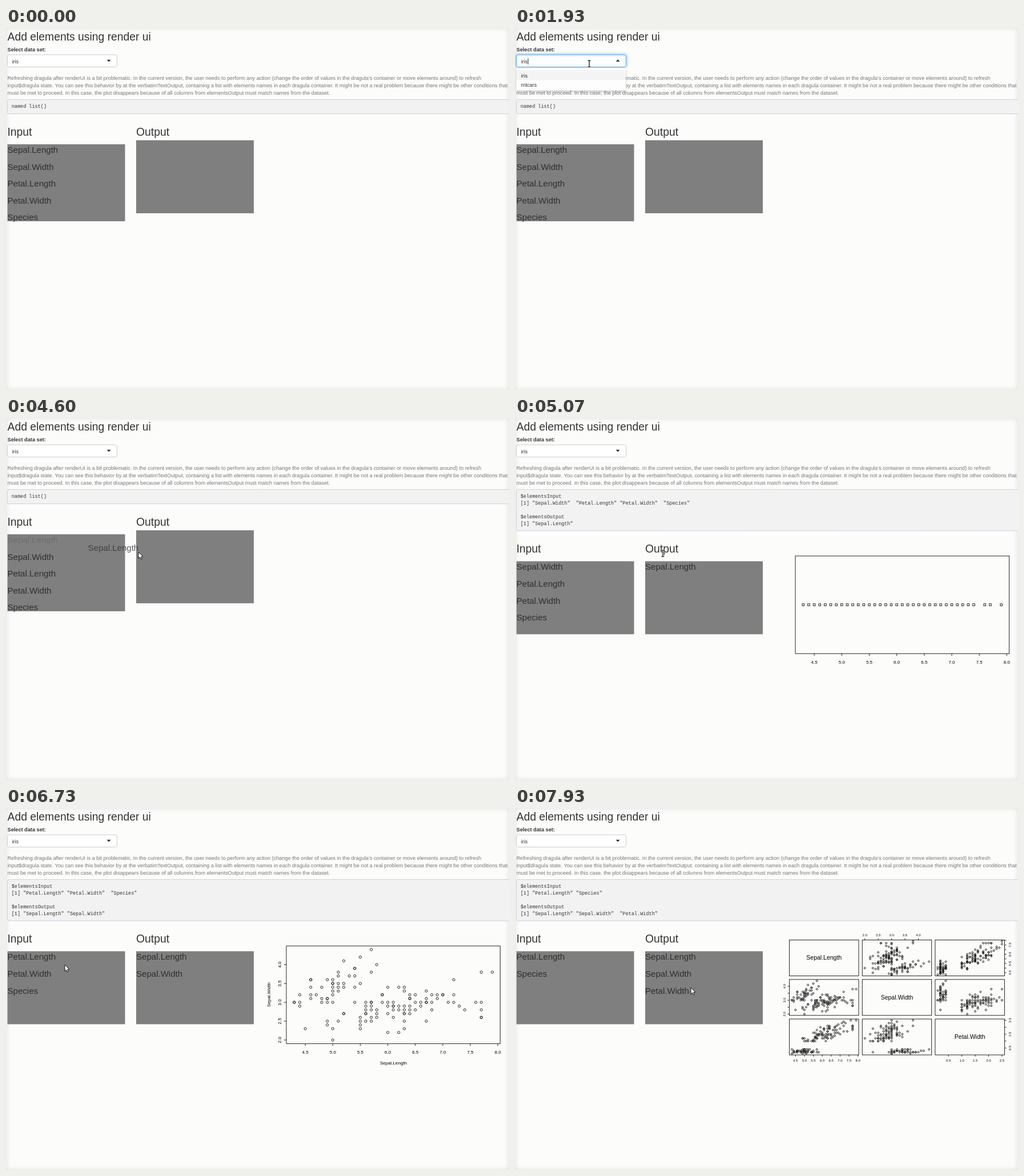
These frames come from a looping animation (881 px wide and 635 px high, 8 s). An HTML page with a canvas:

```html
<!DOCTYPE html>
<html lang="en">
<head>
<meta charset="utf-8">
<title>Add elements using render ui</title>
<style>
  html, body { margin: 0; width: 881px; height: 635px; overflow: hidden; background: #fcfcfb; }
  canvas { display: block; box-shadow: inset 0 0 10px #dcdcdc; }
</style>
</head>
<body>
<canvas id="stage" width="881" height="635"></canvas>
<script>
const ctx = document.getElementById('stage').getContext('2d');
const LOOP = 8000, STEP = 200 / 3;
const SANS = '"Liberation Sans", Arial, sans-serif';
const MONO = '"Liberation Mono", monospace';
const ROW = 29.6;

const columns = ['Sepal.Length', 'Sepal.Width', 'Petal.Length', 'Petal.Width', 'Species'];
const help = [
  "Refreshing dragula after renderUI is a bit problematic. In the current version, the user needs to perform any action (change the order of values in the dragula's container or move elements around) to refresh",
  'input$dragula state. You can see this behavior by at the verbatimTextOutput, containing a list with elements names in each dragula container. It might be not a real problem because there might be other conditions that',
  'must be met to proceed. In this case, the plot disappears because of all columns from elementsOutput must match names from the dataset.'
];

// cross: when the placeholder jumps to the other container
const drags = [
  { name: 'Sepal.Length', press: 4190, cross: 4660, drop: 4860, plot: 4930, x: 91, y: 221.5 },
  { name: 'Sepal.Width', press: 5700, cross: 6120, drop: 6330, plot: 6400, x: 95, y: 266 },
  { name: 'Petal.Width', press: 6920, cross: 7200, drop: 7390, plot: 7460, x: 100, y: 290 }
];

// time, x, y of the pointer
const path = [
  [1000, 872, 240], [1730, 130, 62], [1930, 130, 62], [2330, 150, 255], [2670, 110, 208],
  [3070, 110, 208], [3400, 60, 84], [3730, 101, 140.5], [3930, 104, 170], [4130, 91, 221.5],
  [4200, 91, 221.5], [4600, 232, 235], [4730, 259, 237], [5070, 259, 237], [5600, 95, 266],
  [5700, 95, 266], [6270, 300, 290], [6530, 300, 290], [6730, 103, 275], [6870, 100, 290],
  [6930, 100, 290], [7370, 308, 315]
];

// iris sepal widths (mm) grouped by sepal length, starting at 43 mm
const sepalWidths = [
  [30], [29, 30, 32], [23], [31, 32, 34, 36], [32], [30, 31, 34], [24, 25, 30, 31, 36],
  [20, 23, 30, 32, 33, 34, 35, 36], [25, 33, 34, 35, 37, 38], [27, 34, 35, 41], [37],
  [30, 34, 37, 39], [23, 24, 25, 26, 35, 42], [25, 27, 28, 29, 30],
  [25, 26, 28, 29, 30, 38, 44], [26, 27, 28, 40], [30, 32], [22, 27, 29, 30, 34],
  [26, 28, 29, 30], [22, 28, 29, 34], [23, 25, 27, 28, 29, 33, 34], [27, 28, 29, 31, 32],
  [28, 30, 32], [29, 30], [25, 30, 31, 33], [28, 30, 32], [31, 32], [32], [30],
  [30, 32, 36], [29], [28], [], [30], [26, 28, 30, 38], [], [38]
];

let seed = 7;
const random = () => (seed = seed * 16807 % 2147483647) / 2147483647;

function petalWidth(length, width) {
  if (width >= length - 22) return Math.round(1.4 + 3 * random() ** 2);   // setosa
  const mean = 10 + 0.33 * (length - 50) + 0.3 * (width - 26);
  return Math.max(10, Math.min(25, Math.round(mean + 9 * (random() - 0.4))));
}

const flowers = [];
sepalWidths.forEach((widths, i) => widths.forEach(w => {
  const length = 43 + i, copies = flowers.length % 9 < 2 ? 2 : 1;
  for (let c = 0; c < copies; c++) flowers.push([length / 10, w / 10, petalWidth(length, w) / 10]);
}));

const vars = [
  { name: 'Sepal.Length', min: 4.3, max: 7.9 },
  { name: 'Sepal.Width', min: 2, max: 4.4 },
  { name: 'Petal.Width', min: 0.1, max: 2.5 }
].map(v => {
  const pad = (v.max - v.min) * 0.04;
  return { name: v.name, lo: v.min - pad, hi: v.max + pad };
});
const part = (v, value) => (value - v.lo) / (v.hi - v.lo);

function text(s, x, y, size, color = '#333', font = SANS, weight = '') {
  ctx.font = `${weight} ${size}px ${font}`;
  ctx.fillStyle = color;
  ctx.fillText(s, x, y);
}

function centered(s, x, y, size, turned) {
  ctx.save();
  ctx.translate(x, y);
  if (turned) ctx.rotate(-Math.PI / 2);
  ctx.textAlign = 'center';
  text(s, 0, size * 0.36, size, '#000');
  ctx.restore();
}

function roundBox(x, y, w, h, r, fill, stroke) {
  ctx.beginPath();
  ctx.roundRect(x, y, w, h, r);
  ctx.fillStyle = fill;
  ctx.fill();
  ctx.strokeStyle = stroke;
  ctx.stroke();
}

function line(x1, y1, x2, y2) {
  ctx.beginPath();
  ctx.moveTo(x1, y1);
  ctx.lineTo(x2, y2);
  ctx.stroke();
}

function polygon(points) {
  ctx.beginPath();
  points.forEach(p => ctx.lineTo(...p));
  ctx.closePath();
}

function axis(v, side, b, size, gap, every = 1) {
  let count = 0;
  for (let value = Math.ceil(v.lo * 2) / 2; value <= v.hi; value += 0.5) {
    const f = part(v, value), label = value.toFixed(1), shown = count++ % every === 0;
    if (side === 'bottom' || side === 'top') {
      const x = b.x + f * b.w, dir = side === 'top' ? -1 : 1, y = side === 'top' ? b.y : b.y + b.h;
      line(x, y, x, y + dir * size / 2);
      if (shown) centered(label, x, y + dir * gap, size);
    } else {
      const y = b.y + b.h - f * b.h, dir = side === 'left' ? -1 : 1, x = side === 'left' ? b.x : b.x + b.w;
      line(x, y, x + dir * size / 2, y);
      if (shown) centered(label, x + dir * gap, y, size, true);
    }
  }
}

function scatter(xi, yi, b, radius) {
  for (const f of flowers) {
    ctx.beginPath();
    ctx.arc(b.x + part(vars[xi], f[xi]) * b.w, b.y + b.h - part(vars[yi], f[yi]) * b.h, radius, 0, 7);
    ctx.stroke();
  }
}

const big = { x: 491, y: 242, w: 374.6, h: 171.3 };

function stripChart() {
  ctx.strokeRect(big.x, big.y, big.w, big.h);
  axis(vars[0], 'bottom', big, 8, 15);
  sepalWidths.forEach((widths, i) => {
    if (widths.length) ctx.strokeRect(big.x + part(vars[0], 4.3 + i / 10) * big.w - 1.8, 325.8, 3.6, 3.6);
  });
}

function scatterPlot() {
  ctx.strokeRect(big.x, big.y, big.w, big.h);
  axis(vars[0], 'bottom', big, 8, 15);
  axis(vars[1], 'left', big, 8, 12);
  scatter(0, 1, big, 2.1);
  centered('Sepal.Length', 678.5, 447, 8);
  centered('Sepal.Width', 460, 327.5, 8, true);
}

function pairsPlot() {
  for (let row = 0; row < 3; row++) for (let col = 0; col < 3; col++) {
    const b = { x: 480.5 + col * 127.7, y: 231.5 + row * 69.3, w: 121.5, h: 63 };
    ctx.strokeRect(b.x, b.y, b.w, b.h);
    if (row === col) centered(vars[row].name, b.x + b.w / 2, b.y + b.h / 2 - 0.5, 10.5);
    else scatter(col, row, b, 1.5);
    if (row === 0 && col === 1) axis(vars[1], 'top', b, 6, 8.7);
    if (row === 2 && col !== 1) axis(vars[col], 'bottom', b, 6, 9.3);
    if (row === 1 && col === 0) axis(vars[1], 'left', b, 6, 8.5, 2);
    if (row !== 1 && col === 2) axis(vars[row], 'right', b, 6, 9.5, 2);
  }
}

function container(title, x, items, ghost, dy) {
  text(title, x, 189 + dy, 19.33);
  ctx.fillStyle = '#7f7f7f';
  ctx.fillRect(x, (items.length ? 204 : 197) + dy, 206, Math.max(128, items.length * ROW - 13));
  items.forEach((name, i) => {
    ctx.globalAlpha = name === ghost ? 0.2 : 1;
    text(name, x, 219 + i * ROW + dy, 15.05, '#2e2e2e');
  });
  ctx.globalAlpha = 1;
}

function printed(items) {
  const quoted = items.map(s => `"${s}"`), width = Math.max(...quoted.map(q => q.length));
  return '[1] ' + quoted.map(q => q.padEnd(width)).join(' ');
}

function select(open, focused) {
  ctx.save();
  if (focused) { ctx.shadowColor = '#66afe9'; ctx.shadowBlur = 5; }
  roundBox(2.5, 47, 192, 21.5, 3, '#fff', focused ? '#77aede' : '#ccc');
  ctx.restore();
  text('iris', 10.5, 62, 9.17);
  const base = open ? 58.7 : 55.7, tip = open ? 55.2 : 59.2;
  polygon([[176.6, base], [183.6, base], [180.1, tip]]);
  ctx.fillStyle = '#222';
  ctx.fill();
  if (!open) return;
  ctx.fillRect(22.5, 53, 0.9, 11);
  ctx.save();
  ctx.shadowColor = 'rgba(0,0,0,.2)';
  ctx.shadowBlur = 4;
  ctx.shadowOffsetY = 2;
  ctx.fillStyle = '#fdfdfd';
  ctx.fillRect(2.5, 70, 191.5, 39.5);
  ctx.restore();
  ctx.fillStyle = '#f4f4f4';
  ctx.fillRect(3, 74.5, 190.5, 17);
  text('iris', 10.5, 86.5, 9.17);
  text('mtcars', 10.5, 103, 9.17);
}

function pointerAt(t) {
  const i = path.findIndex(p => p[0] > t);
  if (i < 0) return path[path.length - 1].slice(1);
  const [t0, x0, y0] = path[i - 1], [t1, x1, y1] = path[i];
  const k = (t - t0) / (t1 - t0), e = k * k * (3 - 2 * k);
  return [x0 + (x1 - x0) * e, y0 + (y1 - y0) * e];
}

function pointer(x, y, beam) {
  ctx.save();
  ctx.translate(x, y);
  if (beam) {
    for (const [color, width] of [['#fff', 3], ['#111', 1.3]]) {
      ctx.strokeStyle = color;
      ctx.lineWidth = width;
      line(0, -4.5, 0, 5.5);
      line(-2.5, -5, 2.5, -5);
      line(-2.5, 6, 2.5, 6);
    }
  } else {
    polygon([[0, 0], [0, 11.3], [2.6, 9], [4.4, 12.8], [6.3, 12], [4.6, 8.2], [8, 8]]);
    ctx.fillStyle = '#fff';
    ctx.fill();
    ctx.strokeStyle = '#111';
    ctx.stroke();
  }
  ctx.restore();
}

function draw(t) {
  ctx.clearRect(0, 0, 881, 635);
  ctx.lineWidth = 1;
  const split = key => {
    const output = drags.filter(d => t >= d[key]).map(d => d.name);
    return { output, input: columns.filter(c => !output.includes(c)) };
  };
  const shown = split('cross'), printedLists = split('drop');
  const dropped = printedLists.output.length, dy = dropped ? 47.3 : 0;
  const drag = drags.find(d => t >= d.press && t < d.drop);

  text('Add elements using render ui', 2.5, 21.7, 19.33);
  text('Select data set:', 2.5, 41, 9.2, '#333', SANS, 'bold');
  help.forEach((s, i) => text(s, 2.5, 91 + i * 12.75, 9.17, '#777'));
  select(t >= 1860 && t < 3400, t >= 1860 && t < 3960);

  roundBox(2.5, 125.5, 884, 25 + dy, 2.5, '#f2f2f3', '#cfcfda');
  const lines = dropped
    ? ['$elementsInput', printed(printedLists.input), '', '$elementsOutput', printed(printedLists.output)]
    : ['named list()'];
  lines.forEach((s, i) => text(s, 9.7, 140.3 + i * 11.85, 8.53, '#333', MONO));

  container('Input', 2.5, shown.input, drag?.name, dy);
  container('Output', 228, shown.output, drag?.name, dy);

  ctx.strokeStyle = '#000';
  ctx.lineWidth = 0.85;
  const plots = drags.filter(d => t >= d.plot).length;
  [() => {}, stripChart, scatterPlot, pairsPlot][plots]();
  ctx.lineWidth = 1;

  if (t < 1000) return;
  const [x, y] = pointerAt(t);
  if (drag) {
    const row = printedLists.input.indexOf(drag.name);
    ctx.globalAlpha = 0.8;
    text(drag.name, 2.5 + x - drag.x, 219 + row * ROW + dy + y - drag.y, 15.05);
    ctx.globalAlpha = 1;
  }
  pointer(x, y, t >= 1700 && t < 2000 || t >= 4930 && t < 5150);
}

function tick() {
  const t = performance.now() % LOOP;
  draw(Math.floor((t + 4) / STEP) * STEP % LOOP);
  requestAnimationFrame(tick);
}
tick();
</script>
</body>
</html>
```
